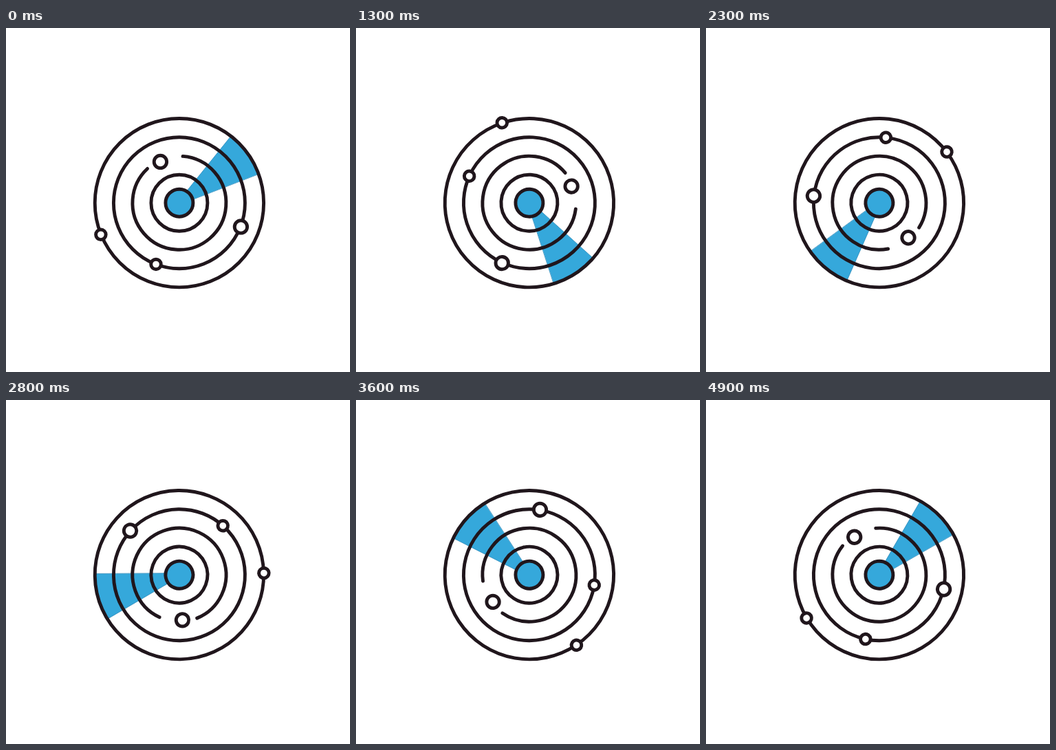
Animation, 500 px wide and 500 px high, one loop 5 s. Source, as an HTML page with a canvas:

```html
<!DOCTYPE html>
<html lang="en">
<head>
<meta charset="utf-8">
<title>Radar</title>
<style>
  html, body { margin: 0; height: 100%; overflow: hidden; background: #fff; }
  canvas { display: block; width: 100vmin; height: 100vmin; }
</style>
</head>
<body>
<canvas id="stage" width="500" height="500"></canvas>
<script>
const ctx = document.getElementById('stage').getContext('2d');
const LOOP = 5000, STEP = 100, SPEED = 71.7; // ms, ms, degrees per second
const INK = '#20161c', BLUE = '#35a8db', EDGE = '#2b8abb';
const rad = deg => deg * Math.PI / 180;

function circle(x, y, r, fill) {
  ctx.beginPath();
  ctx.arc(x, y, r, 0, 2 * Math.PI);
  if (fill) {
    ctx.fillStyle = fill;
    ctx.fill();
  }
  ctx.stroke();
}

function dot(orbit, deg, r) {
  circle(orbit * Math.cos(rad(deg)), orbit * Math.sin(rad(deg)), r, '#fff');
}

// The sweep's tip lies a little behind the centre.
function sweep(mid, half, tip) {
  ctx.beginPath();
  ctx.moveTo(-tip * Math.cos(rad(mid)), -tip * Math.sin(rad(mid)));
  ctx.arc(0, 0, 121.5, rad(mid - half), rad(mid + half));
  ctx.closePath();
  ctx.fillStyle = BLUE;
  ctx.fill();
  ctx.strokeStyle = EDGE;
  ctx.lineWidth = 0.8;
  ctx.stroke();
}

function draw(ms) {
  const turn = SPEED * ms / 1000;
  ctx.setTransform(1, 0, 0, 1, 0, 0);
  ctx.fillStyle = '#fff';
  ctx.fillRect(0, 0, 500, 500);
  ctx.translate(251.9, 254.2);
  ctx.rotate(rad(turn));

  sweep(-36.2, 16.1, 9);

  ctx.strokeStyle = INK;
  ctx.lineWidth = 4.9;
  ctx.lineCap = 'round';

  // rings, the third one open around its dot
  for (const r of [122.7, 95.5, 41]) circle(0, 0, r);
  ctx.beginPath();
  ctx.arc(0, 0, 68, rad(274.3), rad(587));
  ctx.stroke();
  circle(0, 0, 20, BLUE);

  dot(123, 158, 7.3);
  dot(95.5, 110.8, 7.3);
  dot(96, 21.2, 9.2);
  dot(65.8, 245.3, 9.2);
}

function tick() {
  const t = performance.now() % LOOP;
  draw(Math.floor(t / STEP) * STEP);
  requestAnimationFrame(tick);
}
tick();
</script>
</body>
</html>
```
